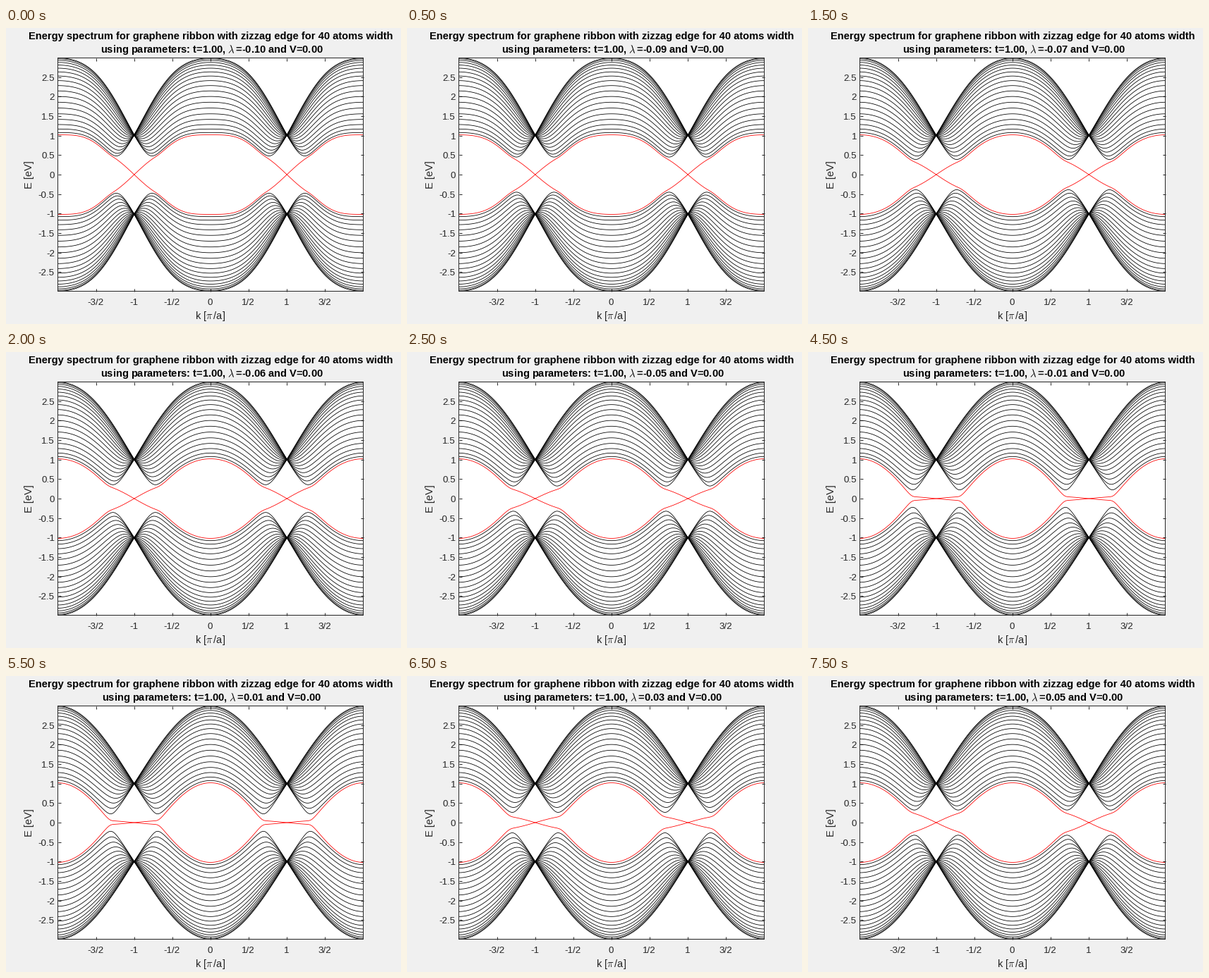
Write a matplotlib script that moves like this. It is 560x420 px and loops after 8 s.

```python
import numpy as np
import matplotlib
import matplotlib.pyplot as plt
from matplotlib.animation import FuncAnimation

W, H, DPI = 560, 420, 100
PT = 72 / DPI                      # points per pixel
INK = (0.15, 0.15, 0.15)
LEFT, RIGHT, TOP, BOTTOM = 73.5, 506.5, 42.5, 373.5

matplotlib.rcParams.update({
    "font.family": "Liberation Sans",
    "mathtext.fontset": "cm",
    "path.simplify": False,
})

ROWS = 20                          # two atoms per row
STEPS = 16
K = np.linspace(-2, 2, 401)


def bands(lam, t=1.0):
    """Zigzag ribbon energies with spin-orbit coupling, shape (k, band)."""
    ka = np.pi * K
    h = np.zeros((K.size, 2 * ROWS, 2 * ROWS))
    a = np.arange(0, 2 * ROWS, 2)
    b = a + 1

    def link(i, j, value):
        h[:, i, j] = h[:, j, i] = value

    link(a, b, 2 * t * np.cos(ka / 2)[:, None])
    link(b[:-1], a[1:], t)
    h[:, a, a] = 8 * lam * np.sin(ka)[:, None]
    h[:, b, b] = -h[:, a, a]
    hop = lam * np.sin(ka / 2)[:, None]
    link(a[:-1], a[1:], hop)
    link(b[:-1], b[1:], -hop)
    return np.linalg.eigvalsh(h)


fig = plt.figure(figsize=(W / DPI, H / DPI), dpi=DPI, facecolor="#f0f0f0")
ax = fig.add_axes([LEFT / W, 1 - BOTTOM / H,
                   (RIGHT - LEFT) / W, (BOTTOM - TOP) / H])


def label(x, y, s, size, **kw):
    kw = {"ha": "center", "va": "baseline", "color": INK, **kw}
    return fig.text(x / W, 1 - y / H, s, fontsize=size * PT, **kw)


e_max = bands(0).max()
ax.set(xlim=(-2, 2), ylim=(-e_max, e_max))
xticks = np.arange(-1.5, 1.6, 0.5)
yticks = np.arange(-2.5, 2.6, 0.5)
ax.set_xticks(xticks)
ax.set_yticks(yticks)
ax.tick_params(direction="in", length=4.3 * PT, width=PT, color=INK,
               top=True, right=True, labelleft=False, labelbottom=False)
for spine in ax.spines.values():
    spine.set(linewidth=PT, color=INK, snap=False)

TICK, LABEL = 10 * 96 / 72, 11 * 96 / 72
mid_x, mid_y = (LEFT + RIGHT) / 2, (TOP + BOTTOM) / 2
for x, s in zip(xticks, ("-3/2", "-1", "-1/2", "0", "1/2", "1", "3/2")):
    label(mid_x - 0.5 + x * (RIGHT - LEFT) / 4, 393, s, TICK)
for y in yticks:
    label(69, mid_y - y * (BOTTOM - TOP) / (2 * e_max) + 5, f"{y:g}", TICK,
          ha="right")

label(mid_x - 0.5, 413, r"k [$\pi\,$/a]", LABEL)
label(40, mid_y, "E [eV]", LABEL, rotation=90, ha="right", va="center")
label(mid_x, 16, "Energy spectrum for graphene ribbon with zizzag edge "
      "for 40 atoms width", LABEL, weight="bold", color="black")
params = label(mid_x + 1.5, 35, "", LABEL, weight="bold", color="black")

lines = [ax.plot(K, 0 * K, lw=0.8 * PT,
                 color="red" if n in (ROWS - 1, ROWS) else "black")[0]
         for n in range(2 * ROWS)]


def update(i):
    lam = (i - 10) / 100
    for line, e in zip(lines, bands(lam).T):
        line.set_ydata(e)
    params.set_text(rf"using parameters: t=1.00, $\lambda\,$={lam:.2f}"
                    " and V=0.00")
    return [*lines, params]


anim = FuncAnimation(fig, update, frames=STEPS, interval=500,
                     init_func=lambda: update(0), repeat=True, repeat_delay=0)
plt.show()
```
